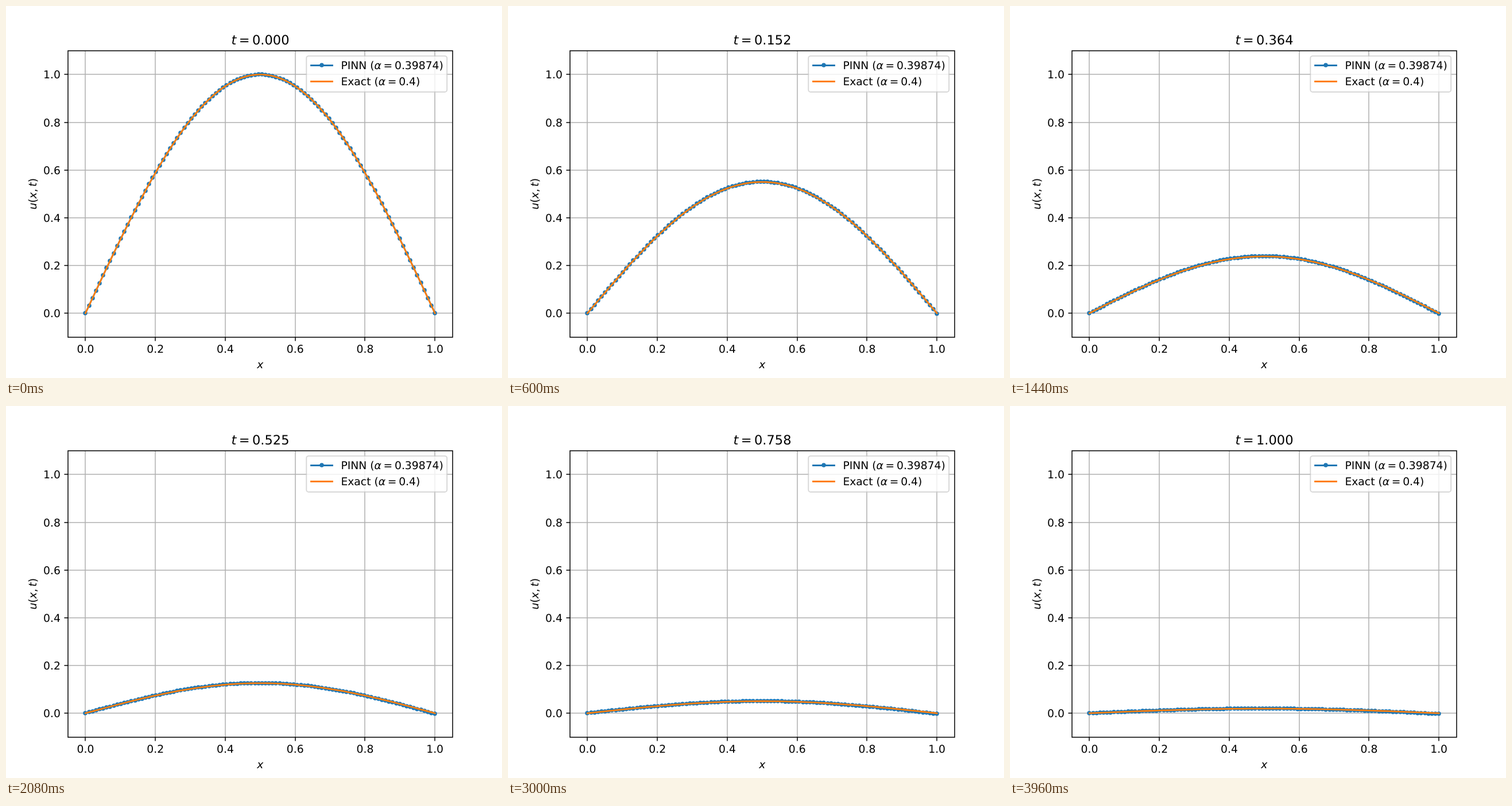
These frames come from a looping animation (864x648 px, 4000 ms). An HTML page:

```html
<!DOCTYPE html>
<html lang="en">
<head>
<meta charset="utf-8">
<title>Heat equation</title>
<style>
html, body { margin: 0; width: 100%; height: 100%; overflow: hidden; background: #fff; }
svg { display: block; width: 864px; height: 648px; }
text { font: 18.75px "DejaVu Sans", sans-serif; text-rendering: geometricPrecision; white-space: pre; }
.it { font-style: italic; }
#title { font-size: 22.5px; }
.curve { fill: none; stroke-width: 2.8125; stroke-linecap: square; stroke-linejoin: round; }
.dots { fill: none; stroke-width: 7.5; stroke-linecap: round; }
.blue { stroke: #1f77b4; }
.orange { stroke: #ff7f0e; }
.thin { fill: none; stroke: #000; stroke-width: 1.5; }
</style>
</head>
<body>
<svg viewBox="0 0 864 648">
  <path id="grid" class="thin" style="stroke:#b0b0b0"/>
  <path id="ticks" class="thin"/>
  <path id="model" class="curve blue"/>
  <path id="dots" class="dots blue"/>
  <path id="exact" class="curve orange"/>
  <rect class="thin" x="108" y="78" width="670" height="499"/>
  <g id="labels"></g>
  <text x="442.8" y="631" text-anchor="middle" class="it">x</text>
  <text transform="translate(53 354.6) rotate(-90)"><tspan class="it">u</tspan>(<tspan class="it">x</tspan>,<tspan class="it" dx="3.65">t</tspan>)</text>
  <text id="title" x="392.6" y="66.5"><tspan class="it">t</tspan><tspan dx="4.38">=</tspan><tspan id="clock" dx="4.38">0.000</tspan></text>
  <rect x="523.3" y="87.1" width="244.9" height="62.6" rx="3.75" fill="#fff" stroke="#ccc" stroke-width="1.875" opacity=".8"/>
  <path class="curve blue" d="M531.5 103.5H568.5"/>
  <path class="dots blue" d="M550 103h0"/>
  <path class="curve orange" d="M531.5 131.5H568.5"/>
  <text x="583.4" y="109.5">PINN (<tspan class="it">α</tspan><tspan dx="3.65">=</tspan><tspan dx="3.65">0.39874)</tspan></text>
  <text x="583.4" y="138">Exact (<tspan class="it">α</tspan><tspan dx="3.65">=</tspan><tspan dx="3.65">0.4)</tspan></text>
</svg>
<script>
const $ = id => document.getElementById(id);
const STEPS = 100, STEP_MS = 40;
const px = x => 108 + 669.6 * (x + 0.05) / 1.1;
const py = u => 576.72 - 498.96 * (u + 0.1) / 1.2;
const snap = v => Math.floor(v + 0.5 + 1e-6);
const xs = Array.from({ length: STEPS }, (_, i) => i / (STEPS - 1));

function label(text, x, y, anchor) {
  const el = document.createElementNS("http://www.w3.org/2000/svg", "text");
  el.setAttribute("x", x);
  el.setAttribute("y", y);
  el.setAttribute("text-anchor", anchor);
  el.textContent = text;
  $("labels").append(el);
}

function drawAxes() {
  let grid = "", ticks = "";
  for (let i = 0; i <= 5; i++) {
    const v = i / 5, x = snap(px(v)), y = snap(py(v));
    grid += `M${x} 78V577M108 ${y}H778`;
    ticks += `M${x} 577v6.56M108 ${y}h-6.56`;
    label(v.toFixed(1), px(v), 604, "middle");
    label(v.toFixed(1), 94.9, y + 7, "end");
  }
  $("grid").setAttribute("d", grid);
  $("ticks").setAttribute("d", ticks);
}

const heat = (x, t, alpha) => Math.exp(-alpha * Math.PI ** 2 * t) * Math.sin(Math.PI * x);

// The fitted solution drifts slightly below zero towards the right edge.
const fitted = (x, t) =>
  heat(x, t, 0.39874) + x ** 4 * (0.0007 - 0.004 * (1 - Math.exp(-4 * t)));

const polyline = f =>
  "M" + xs.map(x => px(x).toFixed(2) + " " + py(f(x)).toFixed(2)).join("L");

function render(ms) {
  const t = Math.floor(ms / STEP_MS) % STEPS / (STEPS - 1);
  const model = x => fitted(x, t);
  $("clock").textContent = t.toFixed(3);
  $("model").setAttribute("d", polyline(model));
  $("dots").setAttribute("d", xs.map(x => `M${snap(px(x))} ${snap(py(model(x)))}h0`).join(""));
  $("exact").setAttribute("d", polyline(x => heat(x, t, 0.4)));
}

drawAxes();
render(0);
const start = performance.now();
(function tick() {
  render(performance.now() - start);
  requestAnimationFrame(tick);
})();
</script>
</body>
</html>
```
